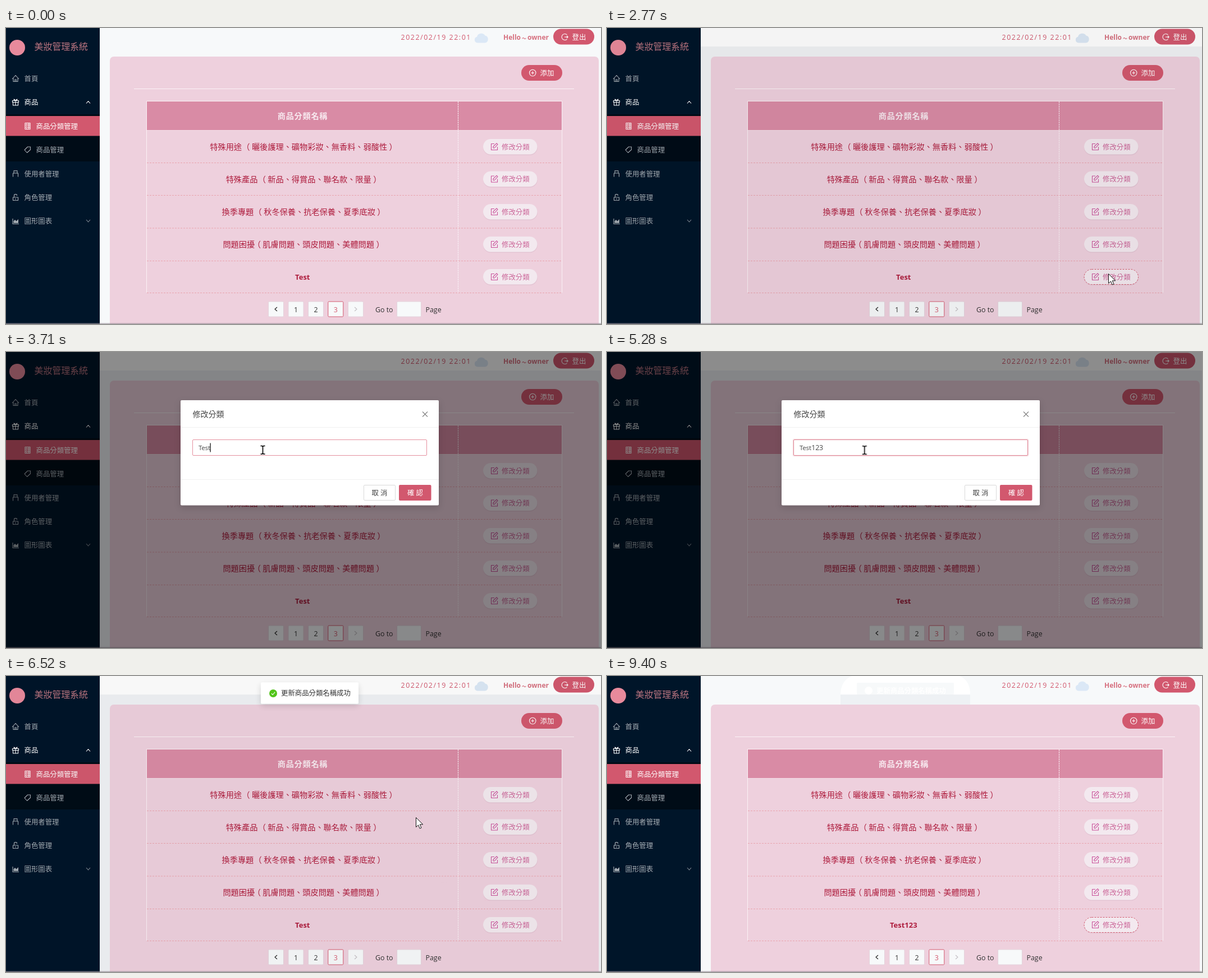
These frames come from a looping animation (1060x528 px, 9800 ms). An HTML page:

```html
<!DOCTYPE html>
<html lang="zh-Hant">
<head>
<meta charset="utf-8">
<title>商品分類管理</title>
<style>
html, body { margin: 0; width: 100%; height: 100%; overflow: hidden; background: #f7f9fa; }
svg { display: block; font: 12.4px "Open Sans", "Noto Sans CJK TC", sans-serif; }
.mid { text-anchor: middle; }
.icon { fill: none; stroke: currentColor; stroke-width: 1.1; stroke-linejoin: round; }
.menu { color: #a6adb4; fill: #a6adb4; }
.menu .hot { color: #fff; fill: #fff; }
.rows { font-size: 14.2px; font-weight: 500; fill: #ae1c3d; }
.rows .latin { font-size: 13px; font-weight: 700; }
.btn { fill: #d2586e; }
.onbtn { color: #fff; fill: #fff; }

/* .run eases between keyframes, .cut jumps */
.run { animation: 9.8s linear infinite; }
.cut { animation: 9.8s step-end infinite; }

#lit { animation-name: lit; }
#mask { animation-name: mask; }
#modal { animation-name: modal; transform-origin: 893px 438px; }
#toast { animation-name: toast; }
#trace { animation-name: trace; }
#ring { animation-name: ring; }
#oldName { animation-name: oldName; }
#newName { animation-name: newName; }
#field { animation-name: field; }
#glow { animation-name: glow; }
#caret { animation-name: caret; }
#caretX { animation-name: caretX; }
#d1 { animation-name: d1; }
#d2 { animation-name: d2; }
#d3 { animation-name: d3; }
#ok { animation-name: ok; }
#pointer { animation-name: pointer; }
#arrow { animation-name: arrow; }
#beam { animation-name: beam; }
#hand { animation-name: hand; }

@keyframes lit { 0%, 67.3%, 100% { opacity: 0 } 28.08% { opacity: 1 } }
@keyframes mask { 0%, 28.08%, 66.66%, 100% { opacity: 0 } 30.12%, 64.62% { opacity: .45 } }
@keyframes modal {
  0%, 66.69%, 100% { opacity: 0; transform: scale(.2) }
  28.89% { opacity: 0; transform: scale(.2); animation-timing-function: cubic-bezier(.08, .82, .17, 1) }
  30.93% { opacity: 1; transform: none }
  64.65% { opacity: 1; transform: none; animation-timing-function: cubic-bezier(.78, .14, .15, .86) }
}
@keyframes toast {
  0%, 74%, 100% { opacity: 0; transform: translateY(-54px) }
  64.61% { opacity: 0; transform: translateY(-54px); animation-timing-function: cubic-bezier(.08, .82, .17, 1) }
  66.65% { opacity: 1; transform: none }
  72% { opacity: 1; transform: none; animation-timing-function: cubic-bezier(.6, .04, .98, .34) }
}
@keyframes trace { 0%, 100% { opacity: 0 } 74% { opacity: 1 } }
@keyframes ring { 0%, 30.8% { opacity: 0 } 26.6%, 67.86%, 100% { opacity: 1 } }
@keyframes oldName { 0% { opacity: 1 } 67.86%, 100% { opacity: 0 } }
@keyframes newName { 0% { opacity: 0 } 67.86%, 100% { opacity: 1 } }
@keyframes field {
  0%, 36.7%, 62.6%, 100% { stroke: #d9d9d9 }
  37.8% { stroke: #e5909f } 40.2%, 61.8% { stroke: #de7f90 }
}
@keyframes glow { 0%, 37.9%, 62.6%, 100% { opacity: 0 } 40.2%, 61.8% { opacity: .16 } }
@keyframes caret { 0%, 42.55%, 53.88%, 61.7%, 100% { opacity: 0 } 37.2%, 46.63%, 58.8% { opacity: 1 } }
@keyframes caretX {
  0%, 100% { transform: none }
  46.63% { transform: translateX(6.9px) }
  48.37% { transform: translateX(13.8px) }
  50.61% { transform: translateX(20.6px) }
}
@keyframes d1 { 0%, 64.4%, 100% { opacity: 0 } 46.63% { opacity: 1 } }
@keyframes d2 { 0%, 64.4%, 100% { opacity: 0 } 48.37% { opacity: 1 } }
@keyframes d3 { 0%, 64.4%, 100% { opacity: 0 } 50.61% { opacity: 1 } }
@keyframes ok { 0%, 58.6%, 67%, 100% { fill: #d2586e } 59.6%, 66% { fill: #e18592 } }
@keyframes pointer {
  0%, 4.4% { transform: translate(832px, 530px) }
  7.1% { transform: translate(650px, 480px) }
  8.9% { transform: translate(556px, 430px) }
  10.4% { transform: translate(505px, 407px) }
  11.8% { transform: translate(464px, 436px) }
  13.1% { transform: translate(505px, 466px) }
  14.08%, 14.7% { transform: translate(562px, 460px) }
  15.5% { transform: translate(551px, 431px) }
  16.43%, 17.6% { transform: translate(568px, 462px); animation-timing-function: ease-in-out }
  22.5% { transform: translate(760px, 424px) }
  25.4% { transform: translate(874px, 427px) }
  27.45%, 30.2% { transform: translate(893px, 438px); animation-timing-function: ease-in-out }
  37.25%, 53.6% { transform: translate(457px, 174px); animation-timing-function: ease-in-out }
  59.39%, 66.9% { transform: translate(730px, 252px); animation-timing-function: ease-in-out }
  74.69% { transform: translate(612px, 112px) }
  76.4% { transform: translate(566px, 46px) }
  77.65%, 79% { transform: translate(530px, 20px); animation-timing-function: ease-in-out }
  84% { transform: translate(590px, 410px) }
  85.6% { transform: translate(510px, 414px) }
  86.7% { transform: translate(449px, 445px) }
  87.8% { transform: translate(510px, 470px) }
  88.88%, 91.4% { transform: translate(572px, 482px); animation-timing-function: ease-in }
  95.8%, 100% { transform: translate(978px, 532px) }
}
@keyframes arrow {
  0%, 36.9%, 58.7%, 95.8%, 100% { opacity: 0 }
  4.5%, 54.6%, 65.9% { opacity: 1 }
}
@keyframes beam { 0%, 54.6%, 100% { opacity: 0 } 36.9% { opacity: 1 } }
@keyframes hand { 0%, 65.9%, 100% { opacity: 0 } 58.7% { opacity: 1 } }
</style>
</head>
<body>
<svg width="1060" height="528" viewBox="0 0 1060 528">
  <defs>
    <g id="pill">
      <rect x="850" y="-13" width="97" height="28" rx="14" fill="#d9b9c9" opacity=".5"/>
      <rect x="850" y="-14" width="96.5" height="27.5" rx="13.7" fill="#f3e9ef"/>
      <path class="icon" color="#c9509a" d="M870 -5.500H864.500V5.500H875.500V0M868 2V-.5L874 -6.300 876 -4.300 870.300 2Z"/>
      <text x="883" y="4.700" fill="#cb6598">修改分類</text>
    </g>
    <rect id="box" y="488" width="27" height="27" rx="1.500"/>
    <path id="chevron" class="icon" d="M-3.500 2L0 -2 3.500 2" stroke-width="1.500"/>
    <filter id="soft" x="-20%" y="-40%" width="140%" height="200%">
      <feDropShadow dx="0" dy="4" stdDeviation="6" flood-color="#000" flood-opacity=".15"/>
    </filter>
  </defs>

  <!-- page -->
  <rect width="1060" height="528" fill="#f7f9fa"/>
  <g id="lit" class="cut">
    <rect width="1060" height="33" fill="#fff"/>
    <rect y="33" width="1060" height="495" fill="#f0f2f5"/>
  </g>
  <g id="trace" class="cut">
    <path d="M416 33C416 14 426 2 442 -2H622C639 2 647 14 647 33Z" fill="#fff"/>
    <rect x="416" y="33" width="231" height="18" fill="#eef1f4"/>
    <rect x="445" y="12" width="173" height="21" rx="2" fill="#f7f9fa"/>
    <circle cx="466" cy="26" r="7" fill="#fff"/>
    <text x="480" y="31" fill="#fff" font-weight="700">更新商品分類名稱成功</text>
  </g>

  <!-- top bar -->
  <text x="703.500" y="20.700" fill="#d2586e" letter-spacing="1.55">2022/02/19 22:01</text>
  <path d="M840 26.500a5.500 5.500 0 0 1 -1 -10.800a8 8 0 0 1 14.500 -2.200a6.600 6.600 0 0 1 -.5 13Z" fill="#dbe8f6"/>
  <text x="886" y="20.700" font-size="12" fill="#d6707f" font-weight="700">Hello<tspan dx="2" font-size="8">～</tspan><tspan dx="2">owner</tspan></text>
  <rect class="btn" x="975" y="1.500" width="73" height="28" rx="14"/>
  <g class="onbtn">
    <path class="icon" d="M999.500 12.200A5.500 5.500 0 1 0 999.500 19.800M995 16H1001M999 14L1001.200 16 999 18" stroke-width="1.300"/>
    <text x="1008.500" y="20.500">登出</text>
  </g>

  <!-- panel -->
  <path d="M185 528V58a7 7 0 0 1 7 -7H1049a7 7 0 0 1 7 7V528Z" fill="#eed0dd"/>
  <path d="M228 108.500H1012" stroke="#fbf3f7"/>
  <rect class="btn" x="918" y="66" width="73" height="28" rx="14"/>
  <g class="onbtn">
    <path class="icon" d="M932.500 80a5.700 5.700 0 1 0 11.400 0a5.700 5.700 0 1 0 -11.400 0M935.500 80H941M938.200 77.200V82.800" stroke-width="1.200"/>
    <text x="951.500" y="84.700">添加</text>
  </g>

  <!-- table -->
  <rect x="251" y="130" width="739" height="52" fill="#d98ba5"/>
  <path d="M250.500 472V130.500H990.500V472" fill="none" stroke="#faf0f5"/>
  <path d="M251 182.500H990" stroke="#f3dbe5"/>
  <path d="M805.500 131V472" stroke="#faf0f5" stroke-dasharray="3 1"/>
  <path d="M251 240.500H990M251 298.500H990M251 357H990M251 415.500H990M251 472.500H990" stroke="#e9a4ae" stroke-dasharray="3 2"/>
  <text class="mid" x="528.500" y="162" font-size="14.200" font-weight="700" letter-spacing=".7" fill="#f8eaf0">商品分類名稱</text>
  <g class="rows mid">
    <text x="530" y="217">特殊用途 <tspan dx="-3.400">（</tspan><tspan dx="3.400">曬後護理、礦物彩妝、無香料、弱酸性</tspan><tspan dx="3.400">）</tspan></text>
    <text x="530" y="274.500">特殊產品 <tspan dx="-3.400">（</tspan><tspan dx="3.400">新品、得賞品、聯名款、限量</tspan><tspan dx="3.400">）</tspan></text>
    <text x="530" y="333">換季專題 <tspan dx="-3.400">（</tspan><tspan dx="3.400">秋冬保養、抗老保養、夏季底妝</tspan><tspan dx="3.400">）</tspan></text>
    <text x="530" y="391">問題困擾<tspan dx="-3.400">（</tspan><tspan dx="3.400">肌膚問題、頭皮問題、美體問題</tspan><tspan dx="3.400">）</tspan></text>
    <text id="oldName" class="latin cut" x="528.300" y="449">Test</text>
    <text id="newName" class="latin cut" x="528.300" y="449">Test123</text>
  </g>
  <use href="#pill" y="212"/>
  <use href="#pill" y="269.500"/>
  <use href="#pill" y="328"/>
  <use href="#pill" y="386"/>
  <use href="#pill" y="444"/>
  <rect id="ring" class="cut" x="850" y="430.500" width="96.500" height="27" rx="13.500" fill="none" stroke="#d2586e" stroke-dasharray="3 2"/>

  <!-- pagination -->
  <g fill="#f7f9fa" stroke="#e3d3dc">
    <use href="#box" x="467.500"/><use href="#box" x="503"/><use href="#box" x="538.500"/>
    <use href="#box" x="573.800" stroke="#d2586e"/><use href="#box" x="609.500"/>
    <rect x="696.500" y="488" width="43" height="27" rx="1.500"/>
  </g>
  <use href="#chevron" color="#222" transform="translate(481 501.500) rotate(-90)"/>
  <use href="#chevron" color="#c4bfc4" transform="translate(623 501.500) rotate(90)"/>
  <g fill="#333">
    <g class="mid">
      <text x="516.500" y="506.500">1</text>
      <text x="552" y="506.500">2</text>
      <text x="587.300" y="506.500" fill="#d2586e">3</text>
    </g>
    <text x="658" y="506.500">Go to</text>
    <text x="747.500" y="506.500">Page</text>
  </g>

  <!-- sidebar -->
  <rect width="167" height="528" fill="#001529"/>
  <rect y="154" width="167" height="84" fill="#000c17"/>
  <rect class="btn" y="157" width="167" height="35.500"/>
  <circle cx="20" cy="35" r="14" fill="#e88a9c"/>
  <text x="50.500" y="39" font-size="15.900" fill="#bd7581">美妝管理系統</text>
  <g class="menu">
    <path class="icon" d="M11 91L17 84.500 23 91M13 89.500V95.500H21V89.500M15.800 95.500V92H18.200V95.500"/>
    <text x="32.500" y="94.700">首頁</text>
    <g class="hot">
      <path class="icon" d="M11.500 129.500H22.500V132.500H11.500ZM12.500 132.500V138H21.500V132.500M17 129.500V138M17 129.500C12 128 14 125 17 129.500C20 125 22 128 17 129.500"/>
      <text x="32.500" y="136.900">商品</text>
      <use href="#chevron" x="146.500" y="132.500"/>
      <path class="icon" d="M34 169.500H43V180.500H34ZM34 173H43M34 177H43M36 171.300H38M36 175H38M36 179H38M40.500 169.500V180.500"/>
      <text x="53.500" y="179.700">商品分類管理</text>
    </g>
    <path class="icon" d="M38.500 212H43.500V217L37.500 222.500 33 217.500ZM41 214.400V215"/>
    <text x="53.500" y="222">商品管理</text>
    <path class="icon" d="M14 254.500H20V259H14ZM14 259H12.500V265.500M20 259H21.500V265.500M16 256.500V257M18 256.500V257"/>
    <text x="32.500" y="264.500">使用者管理</text>
    <path class="icon" d="M12.500 302H21.500V307.500H12.500ZM14.500 302V298.500C14.500 296 19.500 296 19.500 298.500V299M17 304V306"/>
    <text x="32.500" y="307">角色管理</text>
    <path class="icon" d="M12 340V349.500H23"/>
    <path d="M13.500 348V344.500L16 342 18.500 344.500 22 341V348Z"/>
    <text x="32.500" y="349.400">圖形圖表</text>
    <use href="#chevron" transform="translate(146.500 344) rotate(180)" opacity=".8"/>
  </g>
  <path d="M0 527.300H1060" stroke="#9a929b" stroke-width="1.400" opacity=".7"/>

  <rect id="mask" class="run" width="1060" height="528"/>

  <!-- dialog -->
  <g id="modal" class="run">
    <rect x="311" y="86" width="460" height="187.500" rx="2" fill="#fff" filter="url(#soft)"/>
    <path d="M311 134.500H771M311 227.500H771" stroke="#f0f0f0"/>
    <text x="332.500" y="115.500" font-size="14" fill="#444">修改分類</text>
    <path class="icon" color="#808080" d="M742 106.500L751 115.500M751 106.500L742 115.500"/>
    <rect id="glow" class="run" x="331.500" y="155.500" width="419" height="30" rx="2.500" fill="none" stroke="#d2586e" stroke-width="2" opacity="0"/>
    <rect id="field" class="run" x="332.500" y="156.500" width="417" height="28" rx="1.500" fill="#fff"/>
    <g fill="#484848">
      <text x="343" y="175.300" font-size="11.600" letter-spacing="-.25">Test</text>
      <text id="d1" class="cut" x="364.300" y="175.300">1</text>
      <text id="d2" class="cut" x="371.200" y="175.300">2</text>
      <text id="d3" class="cut" x="378" y="175.300">3</text>
    </g>
    <g id="caretX" class="cut"><rect id="caret" class="cut" x="363.500" y="162.500" width="1.200" height="16"/></g>
    <rect x="637.500" y="237.500" width="56" height="27" rx="1.500" fill="#fff" stroke="#d9d9d9"/>
    <text class="mid" x="665.500" y="255.700" fill="#444">取 消</text>
    <rect id="ok" class="run" x="700" y="237" width="57.500" height="28" rx="2"/>
    <text class="mid" x="729" y="255.700" fill="#fff" font-weight="500">確 認</text>
  </g>

  <!-- message -->
  <g id="toast" class="run">
    <rect x="454" y="11.500" width="174" height="38" rx="2" fill="#fff" filter="url(#soft)"/>
    <circle cx="476" cy="31" r="7" fill="#52c41a"/>
    <path class="icon" color="#fff" d="M472.800 31.200L475.200 33.500 479.200 28.700" stroke-width="1.300"/>
    <text x="490" y="35.300" fill="#333">更新商品分類名稱成功</text>
  </g>

  <!-- mouse -->
  <g id="pointer" class="run" stroke-linejoin="round">
    <path id="arrow" class="cut" d="M.5 .5V17.500L4.500 13.800 7.200 20 10 18.800 7.300 12.800H12.700Z" fill="#fff" stroke="#111"/>
    <path id="beam" class="cut" d="M-3.500 -6.500H-1L.5 -5.500 2 -6.500H4.500M.5 -5.500V7M-3.500 8H-1L.5 7 2 8H4.500" fill="none" stroke="#000" stroke-width="1.600"/>
    <path id="hand" class="cut" d="M-1 2C-1 0 2.500 0 2.500 2V8C4 7 5.500 7.500 5.700 8.800C7 8 8.500 8.600 8.700 10C10 9.400 11 10.300 11 11.500V16C11 19 9.500 20 9.300 24H.5C.3 21 -3.500 18 -6 14C-7.300 11.800 -4.500 10.500 -3 12.300L-1 14.500ZM2.500 8V12M5.700 8.800V12M8.700 10V12.500" fill="#fff" stroke="#111"/>
  </g>
</svg>
</body>
</html>
```
